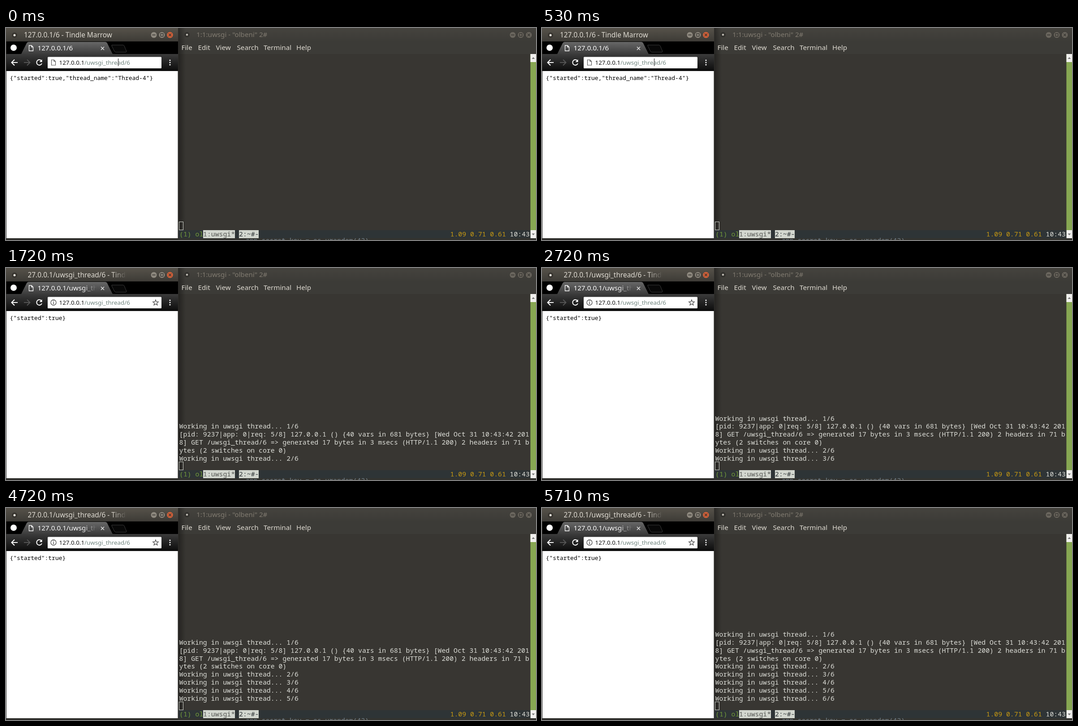
An HTML page for the animation above (7970 ms loop, 1183 by 473 pixels).

```html
<!DOCTYPE html>
<html lang="en">
<head>
<meta charset="utf-8">
<title>Background thread demo</title>
<style>
  html, body { margin: 0; width: 100%; height: 100%; overflow: hidden; background: #383632; }
  svg { display: block; width: 1183px; height: 473px; }
  text { white-space: pre; font-family: "Noto Sans", "Open Sans", sans-serif; font-size: 15.2px; }
  .title { font-size: 15.4px; }
  .url { font-size: 13.35px; }
  .json { font: 13px "Noto Sans Mono", "DejaVu Sans Mono", monospace; }
  .term { font: 14.81px "Noto Sans Mono", "DejaVu Sans Mono", monospace; fill: #dedfd9; }
</style>
</head>
<body>
<svg viewBox="0 0 1183 473">
  <defs>
    <linearGradient id="activeBar" x2="0" y2="1">
      <stop stop-color="#56524a"/><stop offset="1" stop-color="#3d3b36"/>
    </linearGradient>
    <linearGradient id="idleBar" x2="0" y2="1">
      <stop stop-color="#45433e"/><stop offset="1" stop-color="#3c3b37"/>
    </linearGradient>
    <linearGradient id="tab" x2="0" y2="1">
      <stop stop-color="#686868"/><stop offset="1" stop-color="#3c3c3c"/>
    </linearGradient>
    <linearGradient id="toolbar" x2="0" y2="1">
      <stop stop-color="#3b3b3b"/><stop offset="1" stop-color="#0b0b0b"/>
    </linearGradient>
    <linearGradient id="shadow">
      <stop stop-opacity=".35"/><stop offset="1" stop-opacity="0"/>
    </linearGradient>
    <linearGradient id="titleFade" gradientUnits="userSpaceOnUse" x1="236" x2="269" y1="0" y2="0">
      <stop stop-color="#dfdbd2"/><stop offset="1" stop-color="#dfdbd2" stop-opacity="0"/>
    </linearGradient>
    <linearGradient id="tabFade" gradientUnits="userSpaceOnUse" x1="172" x2="202" y1="0" y2="0">
      <stop stop-color="#fff"/><stop offset="1" stop-color="#fff" stop-opacity="0"/>
    </linearGradient>
    <clipPath id="bottomEdge"><path d="M386 467H1170V473H386Z"/></clipPath>
    <path id="page" d="M.5 .5H6L9.500 4V12.500H.5ZM6 .5V4H9.500" fill="none"/>
    <g id="controls" stroke="#34322e">
      <g stroke-width=".6"><circle r="7"/><circle cx="18" r="7"/><circle id="close" cx="36" r="7"/></g>
      <path d="M-3.500 0H3.500M15 -3H21V3H15ZM33 -3L39 3M39 -3L33 3" fill="none" stroke-width="1.3"/>
    </g>
  </defs>

  <!-- terminal window -->
  <rect width="1183" height="473" fill="#383632"/>
  <rect x="385" width="798" height="30" fill="url(#idleBar)"/>
  <rect x="385" y="30" width="798" height="28" fill="#3c3b37"/>
  <rect x="385" width="16" height="469" fill="url(#shadow)"/>
  <circle cx="404" cy="15" r="6" fill="#32312d"/>
  <circle cx="404" cy="15" r="2.300" fill="#bcb8b0"/>
  <text x="425" y="20" fill="#817b71">1:1:uwsgi - "olbeni" 2#</text>
  <use href="#controls" x="1131" y="15.500" fill="#69655d"/>
  <g id="menu" fill="#dfdbd2"></g>
  <rect x="1170.500" y="58" width="12.500" height="411" fill="#87a752"/>
  <path d="M1170.500 58H1183V76H1170.500ZM1170.500 451H1183V469H1170.500Z" fill="#f2f1ef"/>
  <path d="M1173.500 69L1177 65L1180.500 69ZM1173.500 458.500L1177 462.500L1180.500 458.500Z" fill="#777"/>
  <rect x="385" y="451" width="785.500" height="18" fill="#2e3436"/>
  <rect x="385" y="469" width="798" height="4" fill="#33332f"/>
  <text class="term" x="535" y="479" style="fill:#74818a" clip-path="url(#bottomEdge)">app.secret_key = os.urandom(42)</text>
  <path d="M440 451H511V469H440ZM520 451H564V469H520Z" fill="#d3d7cf"/>
  <text class="term" x="387" y="465" style="fill:#729c3a">(1) ol</text>
  <text class="term" x="440" y="465" style="fill:#555753">1:uwsgi*</text>
  <text class="term" x="520" y="465" style="fill:#2e3436">2:~#-</text>
  <text class="term" x="991.500" y="465" style="fill:#c99a12">1.09 0.71 0.61</text>
  <text class="term" x="1124.500" y="465">10:43</text>
  <g id="log"></g>
  <rect x="386.500" y="432.500" width="9" height="18" fill="none" stroke="#d3d7cf"/>

  <!-- browser window -->
  <rect width="385" height="473" fill="#302f2c"/>
  <rect width="384" height="30" fill="url(#activeBar)"/>
  <circle cx="19" cy="16" r="6" fill="#37342f"/>
  <circle cx="19" cy="16" r="2.500" fill="#eee9df"/>
  <text id="title" class="title" y="20.500" fill="url(#titleFade)"></text>
  <use href="#controls" x="330" y="15.500" fill="#8c877d"/>
  <circle cx="366" cy="15.500" r="6.700" fill="#d05f38"/>
  <path d="M363 12.500L369 18.500M369 12.500L363 18.500" stroke="#34322e" stroke-width="1.300"/>
  <rect x="1" y="30" width="383" height="28" fill="#000"/>
  <circle cx="17" cy="44" r="7" fill="#fff"/>
  <path d="M34 58L46 34Q47.500 31 51 31H221Q224.500 31 226 34L238 58Z" fill="url(#tab)"/>
  <path d="M236 38H261Q263 38 264 40L269 52Q269 54 267 54H246Q243 54 242 52L236 40Z" fill="#080808" stroke="#3a3a3a"/>
  <use href="#page" x="51" y="38.500" stroke="#fff" stroke-width="1.300"/>
  <text id="tabTitle" x="70.500" y="50" fill="url(#tabFade)"></text>
  <path d="M212 42L219 49M219 42L212 49" stroke="#ddd" stroke-width="1.600"/>
  <rect x="1" y="58" width="383" height="38" fill="url(#toolbar)"/>
  <g fill="none" stroke="#fff" stroke-width="2">
    <path d="M26 77H13M19 70.500L12.500 77L19 83.500"/>
    <path d="M40 77H53M47 70.500L53.500 77L47 83.500" stroke="#555"/>
    <path d="M79 73A6 6 0 1 0 80 79"/>
    <path d="M80.500 70V76H74.500Z" fill="#fff" stroke="none"/>
  </g>
  <path d="M366 72h.01M366 77h.01M366 82h.01" stroke="#fff" stroke-width="3.200" stroke-linecap="round"/>
  <rect x="93" y="64.500" width="254" height="25.500" rx="1.500" fill="#fff"/>
  <use id="pageIcon" href="#page" x="101" y="70.500" stroke="#555" stroke-width="1.200"/>
  <g id="loadedIcons" fill="none" stroke="#4a4a4a" stroke-width="1.300">
    <circle cx="106" cy="77" r="6"/>
    <path d="M106 76V80.500M106 73V74.500" stroke-width="1.500"/>
    <path id="star"/>
  </g>
  <text class="url" x="118.500" y="81.500" fill="#111">127.0.0.1<tspan fill="#71857f">/uwsgi_thread/6</tspan></text>
  <rect id="caret" x="250" y="68" width="1" height="17" fill="#111"/>
  <rect x="1" y="96" width="382.500" height="373" fill="#fff"/>
  <text id="json" class="json" x="8.500" y="115.500" fill="#000"></text>
</svg>

<script>
const LOOP = 7970;
const LINE_HEIGHT = 17.8;
const LAST_BASELINE = 429.6;
const RESPONSE_AT = 780;
const WORK_TIMES = [740, 1720, 2720, 3720, 4720, 5710];
const REQUEST_LOG = [
  "[pid: 9237|app: 0|req: 5/8] 127.0.0.1 () {40 vars in 681 bytes} [Wed Oct 31 10:43:42 201",
  "8] GET /uwsgi_thread/6 => generated 17 bytes in 3 msecs (HTTP/1.1 200) 2 headers in 71 b",
  "ytes (2 switches on core 0)"
];

const byId = id => document.getElementById(id);
const show = (id, visible) => byId(id).setAttribute("visibility", visible ? "visible" : "hidden");

function addText(parent, x, y, content, className = "") {
  const text = document.createElementNS("http://www.w3.org/2000/svg", "text");
  text.setAttribute("x", x);
  text.setAttribute("y", y);
  text.setAttribute("class", className);
  text.textContent = content;
  parent.append(text);
}

function starPath(cx, cy, outer, inner) {
  const points = Array.from({ length: 10 }, (_, i) => {
    const radius = i % 2 ? inner : outer;
    const angle = i * Math.PI / 5 - Math.PI / 2;
    return `${cx + radius * Math.cos(angle)} ${cy + radius * Math.sin(angle)}`;
  });
  return `M${points.join("L")}Z`;
}

function drawBrowser(loaded) {
  byId("title").setAttribute("x", loaded ? 48.5 : 40);
  byId("title").setAttribute("fill", loaded ? "url(#titleFade)" : "#dfdbd2");
  byId("title").textContent = loaded
    ? "27.0.0.1/uwsgi_thread/6 - Tindle Marrow"
    : "127.0.0.1/6 - Tindle Marrow";
  byId("tabTitle").textContent = loaded ? "127.0.0.1/uwsgi_thread/6" : "127.0.0.1/6";
  byId("json").textContent = loaded
    ? '{"started":true}'
    : '{"started":true,"thread_name":"Thread-4"}';
  show("pageIcon", !loaded);
  show("loadedIcons", loaded);
}

function drawLog(steps) {
  const lines = Array.from({ length: steps }, (_, i) => `Working in uwsgi thread... ${i + 1}/6`);
  if (steps) lines.splice(1, 0, ...REQUEST_LOG);
  byId("log").replaceChildren();
  lines.forEach((line, i) => {
    const y = LAST_BASELINE - (lines.length - 1 - i) * LINE_HEIGHT;
    addText(byId("log"), 386.5, y, line, "term");
  });
}

let lastState = "";
function render(time) {
  const loaded = time >= RESPONSE_AT;
  const steps = WORK_TIMES.filter(start => time >= start).length;
  show("caret", time < 50 || (time >= 530 && time < WORK_TIMES[0]));
  const state = `${loaded} ${steps}`;
  if (state === lastState) return;
  lastState = state;
  drawBrowser(loaded);
  drawLog(steps);
}

const MENU = { File: 391.5, Edit: 428.5, View: 468.5, Search: 515.5, Terminal: 575, Help: 648 };
for (const [label, x] of Object.entries(MENU)) addText(byId("menu"), x, 49, label);
byId("star").setAttribute("d", starPath(334, 77.5, 6.5, 2.8));

const startTime = performance.now();
function tick() {
  render((performance.now() - startTime) % LOOP);
  requestAnimationFrame(tick);
}
tick();
</script>
</body>
</html>
```
